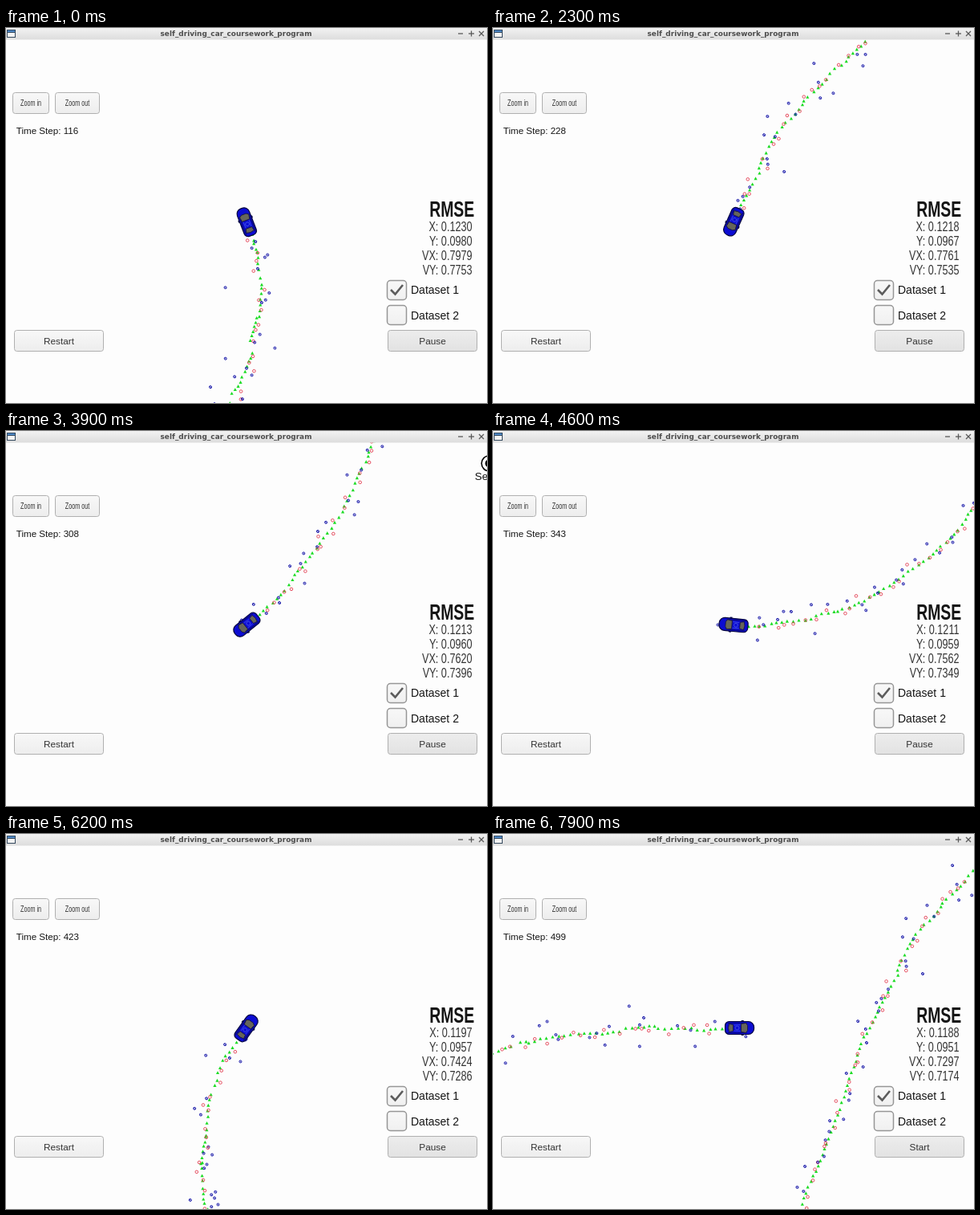
These frames come from a looping animation (600 px wide and 467 px high, 8 s). An HTML page with a canvas:

```html
<!DOCTYPE html>
<html lang="en">
<head>
<meta charset="utf-8">
<title>Tracking simulator</title>
<style>
html, body { margin: 0; width: 100%; height: 100%; overflow: hidden; background: #fdfdfd; }
canvas { display: block; }
</style>
</head>
<body>
<canvas id="stage" width="600" height="467"></canvas>
<script>
const ctx = document.getElementById('stage').getContext('2d');
const W = 600, H = 467, LOOP = 8000, FRAME = 100;
const LAST = 499, SCALE = 29, CX = 300, CY = 241.5;
const SANS = '"Liberation Sans", Arial, sans-serif';
const TURN = 2 * Math.PI / 500;

let seed = 20177;
function rand() {
  seed = (seed * 1664525 + 1013904223) % 4294967296;
  return seed / 4294967296;
}
function gauss() {
  return Math.sqrt(-2 * Math.log(1 - rand())) * Math.cos(2 * Math.PI * rand());
}

// The yaw rate is a sine wave, so the car swings round and back again.
const heading = s => 2.188 * (1 - Math.cos(TURN * s));
const speed = s => 5 + 0.2 * Math.cos(2 * TURN * s);

const path = [{ x: 0, y: 0 }];
for (let s = 1; s <= LAST + 1; s++) {
  const d = speed(s - 0.5) * 0.05 * SCALE, a = heading(s - 0.5), p = path[s - 1];
  path.push({ x: p.x + d * Math.cos(a), y: p.y - d * Math.sin(a) });
}
const sensor = { x: path[273].x + 152, y: path[273].y + 6.5 };

// Laser and radar take turns; the estimate is a smoothed mix of both.
const marks = [];
let ex = -8, ey = -12;
path.forEach((p, s) => {
  const laser = s % 2 === 0;
  let dx, dy;
  if (laser) {
    dx = gauss() * 4;
    dy = gauss() * 4;
  } else {
    const rx = p.x - sensor.x, ry = p.y - sensor.y, r = Math.hypot(rx, ry) || 1;
    const along = gauss() * 9, across = gauss() * 0.033 * r;
    dx = (rx * along - ry * across) / r;
    dy = (ry * along + rx * across) / r;
  }
  ex = ex * 0.88 + dx * 0.12;
  ey = ey * 0.88 + dy * 0.12;
  marks.push({ laser, x: p.x + dx, y: p.y + dy, ex: p.x + ex, ey: p.y + ey });
});

function stepAt(frame) {
  const s = frame < 14 ? Math.round(116 + frame * 67 / 14) : 183 + 5 * (frame - 14);
  return Math.min(LAST, s);
}

const KEYS = [
  [116, 1230, 980, 7979, 7753],
  [183, 1221, 974, 7845, 7626],
  [273, 1215, 960, 7677, 7443],
  [343, 1211, 959, 7562, 7349],
  [388, 1202, 961, 7481, 7337],
  [463, 1192, 953, 7359, 7227],
  [499, 1188, 951, 7297, 7174]
];
function errorAt(s, col) {
  let i = 0;
  while (i < KEYS.length - 2 && s > KEYS[i + 1][0]) i++;
  const a = KEYS[i], b = KEYS[i + 1];
  const v = a[col] + (b[col] - a[col]) * (s - a[0]) / (b[0] - a[0]);
  return (Math.round(v) / 10000).toFixed(4);
}

function text(str, x, y, size, { align = 'left', color = '#151515', weight = '', squeeze = 1, font = SANS } = {}) {
  ctx.save();
  ctx.translate(x, y);
  ctx.scale(squeeze, 1);
  ctx.font = `${weight} ${size}px ${font}`;
  ctx.textAlign = align;
  ctx.fillStyle = color;
  ctx.fillText(str, 0, 0);
  ctx.restore();
}

function line(points, color, width) {
  ctx.beginPath();
  points.forEach(([x, y]) => ctx.lineTo(x, y));
  ctx.strokeStyle = color;
  ctx.lineWidth = width;
  ctx.stroke();
}

function shape(points, color) {
  ctx.beginPath();
  points.forEach(([x, y]) => ctx.lineTo(x, y));
  ctx.fillStyle = color;
  ctx.fill();
}

function ring(x, y, r, color, width) {
  ctx.beginPath();
  ctx.arc(x, y, r, 0, 7);
  ctx.strokeStyle = color;
  ctx.lineWidth = width;
  ctx.stroke();
}

function panel(x, y, w, h, r, top, bottom, edge, width = 1) {
  const g = ctx.createLinearGradient(0, y, 0, y + h);
  g.addColorStop(0, top);
  g.addColorStop(1, bottom);
  ctx.beginPath();
  ctx.roundRect(x + 0.5, y + 0.5, w - 1, h - 1, r);
  ctx.fillStyle = g;
  ctx.fill();
  ctx.strokeStyle = edge;
  ctx.lineWidth = width;
  ctx.stroke();
}

function drawTrail(step) {
  const shown = marks.slice(0, step + 1);
  for (const m of shown) {
    shape([[m.ex, m.ey - 2.2], [m.ex + 2.1, m.ey + 1.7], [m.ex - 2.1, m.ey + 1.7]], '#1cdc24');
  }
  for (const m of shown) {
    if (m.laser) {
      ring(m.x, m.y, 1.8, '#e23c50', 0.9);
    } else {
      ring(m.x, m.y, 1.5, '#1414a8', 1);
      line([[m.x - 1.2, m.y - 1.2], [m.x + 1.2, m.y + 1.2]], '#1414a8', 0.7);
    }
  }
}

function drawSensor() {
  ctx.save();
  ctx.translate(sensor.x, sensor.y);
  line([[0, 0], [0, -33]], '#000', 2);
  line([[0, 0], [31, 0]], '#000', 2);
  shape([[0, -41], [5, -32], [-5, -32]], '#000');
  shape([[38, 0], [30, -5], [30, 5]], '#000');
  ctx.beginPath();
  ctx.arc(0, 0, 9.5, 0, 7);
  ctx.fillStyle = '#fdfdfd';
  ctx.fill();
  ring(0, 0, 9.5, '#000', 1.6);
  ctx.beginPath();
  ctx.arc(0, 0, 5, 0, 7);
  ctx.fillStyle = '#000';
  ctx.fill();
  text('Y', 5, -28, 14);
  text('X', 25, -5, 14);
  text('Sensor', 3.5, 20.5, 13.5, { align: 'center' });
  ctx.restore();
}

function drawCar(p, angle) {
  const front = [[2, -5], [8, -6], [10, -3], [10, 3], [8, 6], [2, 5], [2, -5]];
  const rear = [[-8, -4], [-13, -5], [-14, 0], [-13, 5], [-8, 4], [-8, -4]];
  ctx.save();
  ctx.translate(p.x, p.y);
  ctx.rotate(-angle);
  shape([[2, -9.5], [5, -9.5], [6, -7], [3, -7]], '#0a0a50');
  shape([[2, 9.5], [5, 9.5], [6, 7], [3, 7]], '#0a0a50');
  ctx.beginPath();
  ctx.roundRect(-18, -8, 36, 16, [5, 7, 7, 5]);
  ctx.fillStyle = '#0c0cd2';
  ctx.fill();
  ctx.strokeStyle = '#06063c';
  ctx.lineWidth = 1.2;
  ctx.stroke();
  line([[-15, -6], [-3, -6.3], [9, -6]], '#080870', 1);
  line([[-15, 6], [-3, 6.3], [9, 6]], '#080870', 1);
  shape(front, '#66655a');
  shape(rear, '#66655a');
  line(front, '#16163c', 0.8);
  line(rear, '#16163c', 0.8);
  ring(-3, 0, 2.4, '#4a58ea', 0.8);
  line([[-7, -3.5], [1, -3.8]], '#4a58ea', 0.7);
  line([[-7, 3.5], [1, 3.8]], '#4a58ea', 0.7);
  ctx.restore();
}

function drawTitleBar() {
  const g = ctx.createLinearGradient(0, 0, 0, 15);
  g.addColorStop(0, '#f2f2f2');
  g.addColorStop(1, '#dcdcdc');
  ctx.fillStyle = g;
  ctx.fillRect(0, 0, W, 14.5);
  ctx.fillStyle = '#34495e';
  ctx.fillRect(1, 2, 11, 10);
  ctx.fillStyle = '#4d86c4';
  ctx.fillRect(2, 3, 9, 2);
  ctx.fillStyle = '#f4f4f4';
  ctx.fillRect(2, 6, 9, 5);
  text('self_driving_car_coursework_program', 287, 10, 8.95,
    { align: 'center', weight: 'bold', color: '#4c4c4c', font: '"DejaVu Sans", sans-serif' });
  const ink = '#5a5a5a';
  line([[564, 7], [570, 7]], ink, 1.3);
  line([[577, 7], [584, 7]], ink, 1.3);
  line([[580.5, 3.5], [580.5, 10.5]], ink, 1.3);
  line([[590, 4], [596, 10]], ink, 1.3);
  line([[596, 4], [590, 10]], ink, 1.3);
}

function drawControls(step, done) {
  const center = { align: 'center', color: '#333' };
  const zoom = { ...center, squeeze: 0.72 };
  const light = ['#f8f8f8', '#ededed', '#b0b0b0'], dark = ['#ededed', '#e2e2e2', '#b0b0b0'];
  const box = ['#f8f8f8', '#f0f0f0', '#969696', 1.5];
  panel(8, 80, 46, 27, 3, ...light);
  panel(61, 80, 56, 27, 3, ...light);
  text('Zoom in', 31, 97, 10, zoom);
  text('Zoom out', 89, 97, 10, zoom);
  text('Time Step: ' + step, 12.8, 132, 11.6);

  text('RMSE', 584.3, 235, 27, { align: 'right', weight: 'bold', squeeze: 0.72 });
  ['X', 'Y', 'VX', 'VY'].forEach((name, i) => {
    text(`${name}: ${errorAt(step, i + 1)}`, 581.5, 253 + i * 18.1, 15.6,
      { align: 'right', color: '#333', squeeze: 0.81 });
  });

  panel(475, 314, 25, 25, 4, ...box);
  panel(475, 345, 25, 25, 4, ...box);
  line([[480, 326], [485.5, 331.5], [495, 320]], '#5c5c5c', 2.6);
  text('Dataset 1', 505, 331, 14);
  text('Dataset 2', 505, 362.5, 14);

  panel(10, 376, 112, 27, 3, ...light);
  panel(476, 376, 112, 27, 3, ...dark);
  text('Restart', 66, 394, 11.8, center);
  text(done ? 'Start' : 'Pause', 532, 394, 11.8, center);
}

function draw(now) {
  const frame = Math.floor((now % LOOP) / FRAME), step = stepAt(frame);
  const done = frame === LOOP / FRAME - 1, eye = path[step];
  // When the run ends the car rolls one step past the camera.
  const car = done ? step + 1 : step;
  ctx.fillStyle = '#fdfdfd';
  ctx.fillRect(0, 0, W, H);
  ctx.save();
  ctx.translate(CX - eye.x, CY - eye.y);
  drawSensor();
  drawTrail(step);
  drawCar(path[car], heading(car));
  ctx.restore();
  drawControls(step, done);
  drawTitleBar();
}

const start = performance.now();
function tick() {
  draw(performance.now() - start);
  requestAnimationFrame(tick);
}
tick();
</script>
</body>
</html>
```
